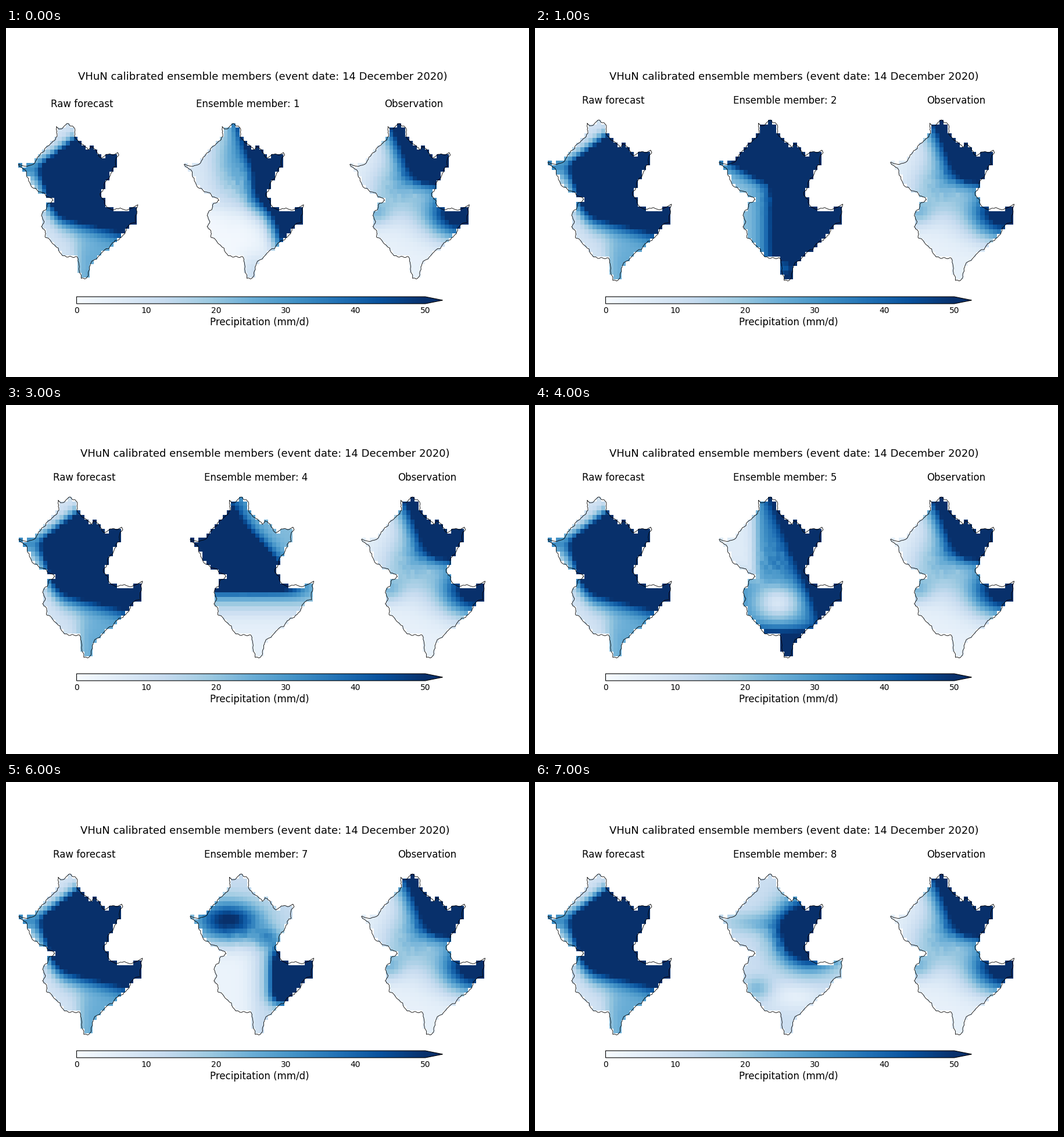
Animation, 900 px wide and 600 px high, one loop 8000 ms. Source, as a matplotlib script:

```python
import numpy as np
import matplotlib.pyplot as plt
from matplotlib.animation import FuncAnimation
from matplotlib.path import Path

W, H, DPI = 900, 600, 100
COLS, ROWS = 30, 35
LEFT, TOP, CELL_W, CELL_H = 22, 157.8, 7.04, 7.84
CMAP = plt.get_cmap("Blues")
VMAX = 50

# Corners of the basin border, clockwise from the northern tip
BORDER = [
    (90, 164), (97, 168), (110, 158), (119, 163), (122, 180), (134, 194),
    (146, 205), (151, 199), (163, 211), (170, 220), (179, 213), (199, 210),
    (201, 214), (196, 220), (196, 234), (189, 240), (182, 257), (177, 262),
    (175, 272), (168, 282), (168, 288), (176, 296), (177, 304), (190, 312),
    (217, 312), (226, 308), (235, 303), (231, 335), (214, 346), (211, 355),
    (189, 371), (183, 381), (157, 401), (150, 411), (146, 430), (140, 435),
    (134, 434), (130, 416), (126, 395), (108, 396), (87, 375), (70, 361),
    (69, 348), (63, 342), (68, 333), (63, 322), (72, 309), (75, 300),
    (84, 295), (73, 289), (69, 283), (58, 280), (40, 256), (22, 231),
    (33, 234), (52, 227), (62, 211), (82, 192), (88, 187), (90, 175)]

gx, gy = np.meshgrid(LEFT + CELL_W * (np.arange(COLS) + 0.5),
                     TOP + CELL_H * (np.arange(ROWS) + 0.5))
OUTSIDE = ~Path(BORDER).contains_points(
    np.column_stack([gx.ravel(), gy.ravel()])).reshape(ROWS, COLS)


def front(x, y, deg, width):
    """Smooth 0 to 1 step through (x, y), rising in direction deg."""
    a = np.radians(deg)
    d = (gx - x) * np.cos(a) + (gy - y) * np.sin(a)
    return 1 / (1 + np.exp(-d / width))


def east(x, width):
    return front(x, 0, 0, width)


def north(y, width):
    return front(0, y, -90, width)


def south(y, width):
    return front(0, y, 90, width)


def blob(x, y, rx, ry):
    return np.exp(-((gx - x) / rx) ** 2 - ((gy - y) / ry) ** 2)


def speckle(rain, seed):
    """A little noise in the middle of the basin."""
    noise = np.random.default_rng(seed).normal(0, 0.05, rain.shape)
    return rain * (1 + noise * blob(118, 270, 35, 35))


def coastline(points, levels=3):
    """Roughen the border by midpoint displacement."""
    rng = np.random.default_rng(4)
    p = np.array(points + points[:1], float)
    for _ in range(levels):
        step = np.diff(p, axis=0)
        normal = np.column_stack([-step[:, 1], step[:, 0]])
        mid = p[:-1] + step / 2 + normal * rng.uniform(-0.17, 0.17, (len(step), 1))
        p = np.insert(p, np.arange(1, len(p)), mid, axis=0)
    return p


raw = (9 + 24 * blob(28, 236, 38, 22) + 17 * east(125, 7) * south(365, 12)
       + 75 * front(90, 211, 53, 6) * front(62, 245, -15, 8)
       * front(100, 329, -78, 12))
obs = (4 + 17 * blob(105, 275, 50, 48) + 14 * blob(68, 318, 25, 22)
       + 75 * front(118, 222, -25, 13) * north(266, 9)
       + 60 * blob(222, 318, 60, 42))
m1 = (1 + 6 * north(310, 8) + 17 * blob(110, 225, 38, 70)
      + 75 * front(150, 246, -19, 10) + 22 * blob(155, 285, 25, 35)
      + 10 * blob(150, 425, 30, 35))
m2 = (20 + 60 * np.maximum(east(114, 14), front(78, 252, -60, 8))
      - 28 * blob(140, 412, 22, 20))
m4 = (4 + 18 * north(350, 11) + 8 * blob(105, 170, 25, 25)
      + 75 * front(119, 215, 139, 9) * north(316, 8))
m5 = (6 + 26 * np.maximum(east(86, 6), south(295, 8))
      + 45 * front(158, 270, -22, 10) - 24 * blob(124, 340, 42, 32)
      + 30 * south(388, 6))
m7 = (3 + 9 * north(285, 8) + 40 * blob(88, 238, 55, 32)
      + 17 * blob(155, 268, 22, 18) + 10 * east(130, 8) * south(288, 8)
      + 66 * east(163, 7) * south(288, 8) * north(378, 6))
m8 = (11 + 10 * blob(80, 242, 50, 18) + 12 * blob(88, 355, 25, 20)
      + 95 * blob(178, 258, 50, 50) - 7 * blob(155, 368, 45, 25))

members = [speckle(m, seed) for seed, m in enumerate(
    [m1, m2, (m2 + m4) / 2, m4, m5, (m5 + m7) / 2, m7, m8])]
obs = speckle(obs, 20)
border = coastline(BORDER)

# left, top, cell width, cell height, pitch, title centre, title baseline, heading centre
FIRST = (21.3, 163.8, 6.8, 7.57, 285.2, 131, 136, 442)
LATER = (22, 157.8, 7.04, 7.84, 294.8, 135.2, 130, 446)

plt.rcParams["font.family"] = "DejaVu Sans"
fig = plt.figure(figsize=(W / DPI, H / DPI), dpi=DPI, facecolor="white")
ax = fig.add_axes([0, 0, 1, 1])


def label(x, y, text, size):
    ax.text(x, y, text, size=size, ha="center", va="baseline", color="black")


def panel(x, y, w, h, rain):
    ax.pcolormesh(x + w * np.arange(COLS + 1), y + h * np.arange(ROWS + 1),
                  np.ma.array(rain, mask=OUTSIDE), cmap=CMAP, vmin=0, vmax=VMAX)
    ax.plot(x + (border[:, 0] - LEFT) / CELL_W * w,
            y + (border[:, 1] - TOP) / CELL_H * h, color="black", lw=0.6)


def colorbar():
    x0, x1, tip, y0, y1 = 121.5, 721.5, 751.5, 462, 474
    ax.pcolormesh(np.linspace(x0, x1, 257), [y0, y1],
                  np.arange(256)[None], cmap=CMAP)
    mid = (y0 + y1) / 2
    ax.fill([x1, tip, x1], [y0, mid, y1], color=CMAP(1.0), lw=0)
    ax.fill([x0, x1, tip, x1, x0], [y0, y0, mid, y1, y1],
            fill=False, ec="black", lw=0.8)
    for v in range(0, VMAX + 1, 10):
        label(x0 + (x1 - x0) * v / VMAX, 490, str(v), 10)
    label((x0 + tip) / 2, 511, "Precipitation (mm/d)", 12)


def draw(i):
    ax.cla()
    ax.set_axis_off()
    x, y, w, h, pitch, cx, base, head = LATER if i else FIRST
    label(head, 89,
          "VHuN calibrated ensemble members (event date: 14 December 2020)", 13)
    titles = ["Raw forecast", f"Ensemble member: {i + 1}", "Observation"]
    for k, (title, rain) in enumerate(zip(titles, [raw, members[i], obs])):
        panel(x + k * pitch, y, w, h, rain)
        label(cx + k * pitch, base, title, 12)
    colorbar()
    ax.set_xlim(0, W)
    ax.set_ylim(H, 0)


anim = FuncAnimation(fig, draw, frames=len(members), init_func=lambda: None,
                     interval=1000, repeat=True, repeat_delay=0)
plt.show()
```
